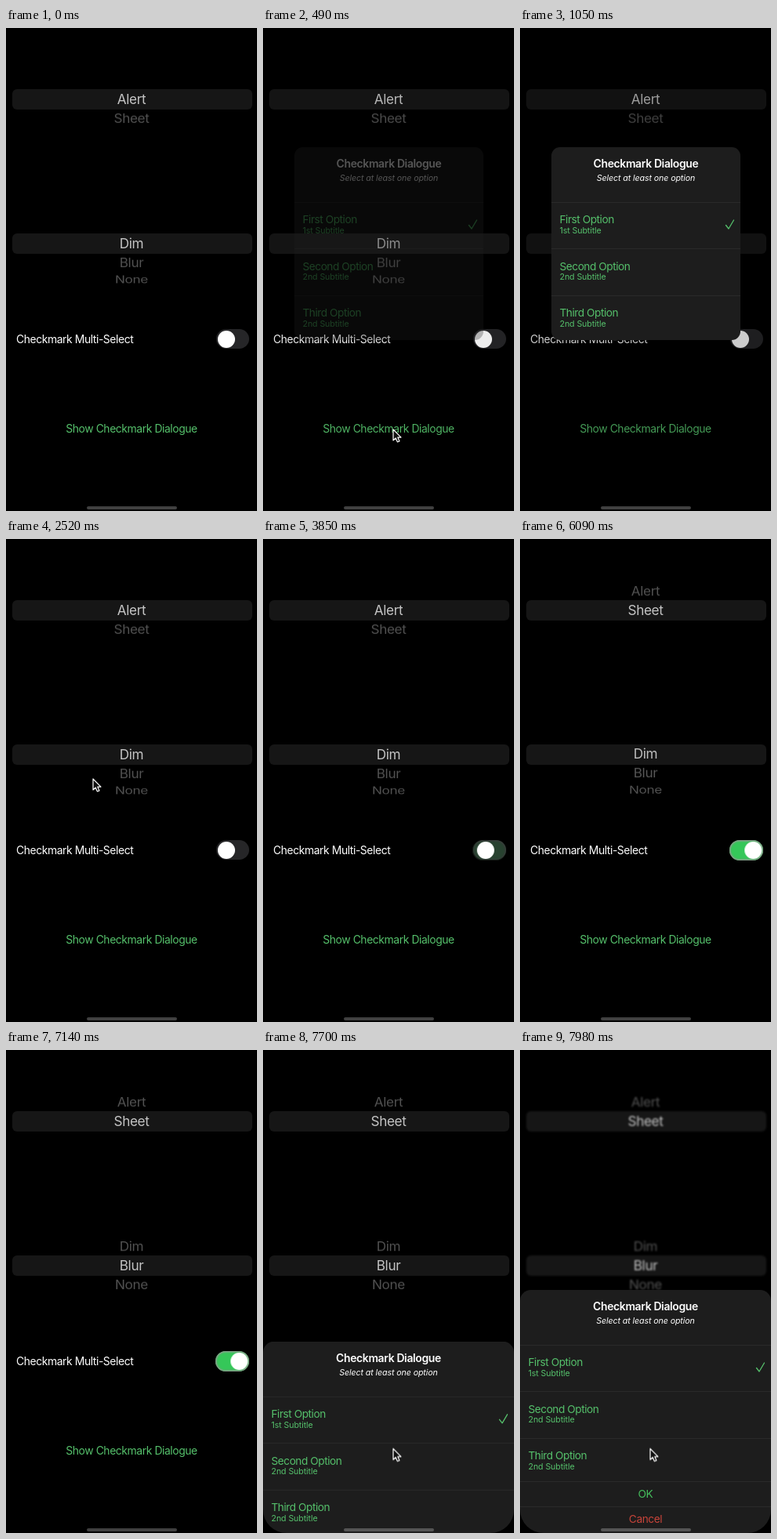
Animation, 320 px wide and 616 px high, one loop 8 s. Source, as an HTML page:

```html
<!DOCTYPE html>
<html lang="en">
<head>
<meta charset="utf-8">
<title>Checkmark Dialogue</title>
<style>
  html, body { margin: 0; width: 100%; height: 100%; overflow: hidden; background: #000; }
  body { font-family: Inter, Roboto, sans-serif; -webkit-font-smoothing: antialiased; }
  div, svg { position: absolute; box-sizing: border-box; }
  .anim, .anim::before { animation: 8s ease-in-out infinite; }

  #stage { left: 0; top: 0; width: 320px; height: 616px; overflow: hidden; background: #000; border-radius: 0 0 30px 30px; }
  #home, .fill { inset: 0; }
  #home { animation-name: soften; }

  .label { height: 20px; line-height: 20px; font-size: 13.95px; letter-spacing: -.032em; white-space: nowrap; color: #fff; }
  .mid { left: 0; width: 100%; text-align: center; }
  .green { color: #55c06b; }

  /* Pickers: items sit on a cylinder seen without perspective */
  .bar { left: 7.5px; width: 306px; height: 26px; border-radius: 6px; background: #161616; }
  .wheel { left: 0; width: 320px; height: 26px; transform-style: preserve-3d; }
  .wheel div {
    inset: 0; line-height: 26px; text-align: center; font-size: 17.2px; letter-spacing: -.022em; color: #525252;
    transform: rotateX(calc(var(--i) * -20.1deg)) translateZ(71px);
  }
  #style { top: 78px; animation-name: turn1; }
  #style .from { animation-name: leave1; }
  #style .to { animation-name: enter1; }
  #back { top: 262px; animation-name: turn2; }
  #back .from { animation-name: leave2; }
  #back .to { animation-name: enter2; }

  .track { left: 268px; top: 384px; width: 41.5px; height: 25px; border-radius: 13px; background: #262628; }
  .on { left: 267px; top: 383.5px; width: 43px; height: 26px; background: #35c759; box-shadow: inset 0 0 2px 1.5px #8f9a90; animation-name: green; }
  .knob { left: 269.5px; top: 385.5px; width: 22.5px; height: 22.5px; border-radius: 50%; background: #fff; animation-name: slide; }

  .dialog { background: #1d1d1d; overflow: hidden; }
  .dialog .title { top: 11.5px; font-weight: 600; letter-spacing: -.025em; }
  .dialog .note { top: 30px; font-size: 10.67px; letter-spacing: -.01em; font-style: italic; }
  .row { left: 0; width: 100%; height: 60px; border-top: 1px solid #2a2a2a; }
  .row .name { left: 10.5px; top: 11.5px; font-size: 13.7px; letter-spacing: -.035em; }
  .row .sub { left: 10.5px; top: 26px; font-size: 10.67px; letter-spacing: -.01em; }
  .row svg { right: 7px; top: 20px; opacity: 0; }
  .row:nth-of-type(3) svg { opacity: 1; }
  .row .action { top: 5px; font-size: 13.7px; }

  #alert { animation-name: fade; }
  #alert .shade { background: rgba(0, 0, 0, .2); }
  #alert .dialog { left: 40px; top: 151.5px; width: 241px; height: 246px; border-radius: 11px; }
  #alert .row:nth-of-type(3) svg { animation: uncheck 8s step-end infinite; }
  #alert .row:nth-of-type(4) svg { animation: check 8s step-end infinite; }
  #sheet { left: 0; top: 305.5px; width: 320px; height: 312px; border-radius: 14px 14px 0 0; animation-name: rise; }

  #pill { left: 103px; top: 610px; width: 114.5px; height: 4px; border-radius: 2px; background: rgba(255, 255, 255, .25); }
  #cursor { left: 0; top: 0; overflow: visible; animation: move 8s ease-in-out infinite, show 8s step-end infinite; }

  @keyframes fade { 0%, 2.625% { opacity: 0 } 11.375%, 22.75% { opacity: 1 } 31.4%, 100% { opacity: 0 } }
  @keyframes uncheck { 0% { opacity: 1 } 22.5%, 100% { opacity: 0 } }
  @keyframes check { 0% { opacity: 0 } 22.5%, 100% { opacity: 1 } }
  @keyframes green { 0%, 46.875% { opacity: 0 } 51.25%, 100% { opacity: 1 } }
  @keyframes slide { 0%, 46.875% { transform: none } 51.25%, 100% { transform: translateX(16.3px) } }
  @keyframes turn1 { 0%, 60.75% { transform: rotateX(0deg) } 67.375%, 100% { transform: rotateX(20.1deg) } }
  @keyframes leave1 { 0%, 60.75% { color: #c4c4c4 } 67.375%, 100% { color: #525252 } }
  @keyframes enter1 { 0%, 60.75% { color: #525252 } 67.375%, 100% { color: #c4c4c4 } }
  @keyframes turn2 { 0%, 75.25% { transform: rotateX(0deg) } 81.375%, 100% { transform: rotateX(20.1deg) } }
  @keyframes leave2 { 0%, 75.25% { color: #c4c4c4 } 81.375%, 100% { color: #525252 } }
  @keyframes enter2 { 0%, 75.25% { color: #525252 } 81.375%, 100% { color: #c4c4c4 } }
  @keyframes soften { 0%, 90.125% { filter: none } 97.125%, 100% { filter: blur(.8px) } }
  @keyframes rise { 0%, 90.125% { transform: translateY(312px) } 99.125%, 100% { transform: none } }
  @keyframes move {
    0%, 11.375% { transform: translate(166px, 512px) }
    20.125% { transform: translate(145px, 420px) }
    22.5%, 33.25% { transform: translate(111px, 306px) }
    33.3%, 100% { transform: translate(166px, 508.5px) }
  }
  @keyframes show {
    0% { opacity: 0 } 2.625% { opacity: 1 } 11.375% { opacity: 0 }
    20.125% { opacity: 1 } 33.25% { opacity: 0 } 90.125%, 100% { opacity: 1 }
  }
</style>
</head>
<body>
<div id="stage">
  <div id="home" class="anim">
    <div class="bar" style="top:78px"></div>
    <div id="style" class="wheel anim">
      <div class="from anim" style="--i:0">Alert</div>
      <div class="to anim" style="--i:1">Sheet</div>
    </div>
    <div class="bar" style="top:262px"></div>
    <div id="back" class="wheel anim">
      <div class="from anim" style="--i:0">Dim</div>
      <div class="to anim" style="--i:1">Blur</div>
      <div style="--i:2">None</div>
    </div>
    <div class="label" style="left:13px;top:387px">Checkmark Multi-Select</div>
    <div class="track"></div>
    <div class="track on anim"></div>
    <div class="knob anim"></div>
    <div class="label mid green" style="top:501px">Show Checkmark Dialogue</div>
  </div>

  <div id="alert" class="fill anim">
    <div class="fill shade"></div>
    <div class="dialog"></div>
  </div>
  <div id="sheet" class="dialog anim"></div>

  <div id="pill"></div>
  <svg id="cursor" width="12" height="18">
    <path d="M0 0V14L3.2 11L5.4 16L8 14.9L5.8 10.1H10Z" fill="#111" stroke="#fff" stroke-width="1.2" stroke-linejoin="round"/>
  </svg>
</div>

<script>
  const options = [["First", "1st"], ["Second", "2nd"], ["Third", "2nd"]];
  const tick = `<svg width="13" height="15"><path d="M1.5 8.5L5 13L11.5 2" fill="none" stroke="#55c06b" stroke-width="1.3" stroke-linecap="round" stroke-linejoin="round"/></svg>`;

  const row = (top, content) => `<div class="row" style="top:${top}px">${content}</div>`;
  const action = (text, color) => `<div class="label mid action" style="color:${color}">${text}</div>`;

  const body = `<div class="label mid title">Checkmark Dialogue</div>
    <div class="label mid note">Select at least one option</div>` +
    options.map(([name, nth], i) => row(70 + 59.5 * i,
      `<div class="label green name">${name} Option</div>
       <div class="label green sub">${nth} Subtitle</div>${tick}`)).join("");

  document.querySelector("#alert .dialog").innerHTML = body;
  document.querySelector("#sheet").innerHTML = body +
    row(244.5, action("OK", "#45bf5d")) + row(276.5, action("Cancel", "#c8443a"));
</script>
</body>
</html>
```
